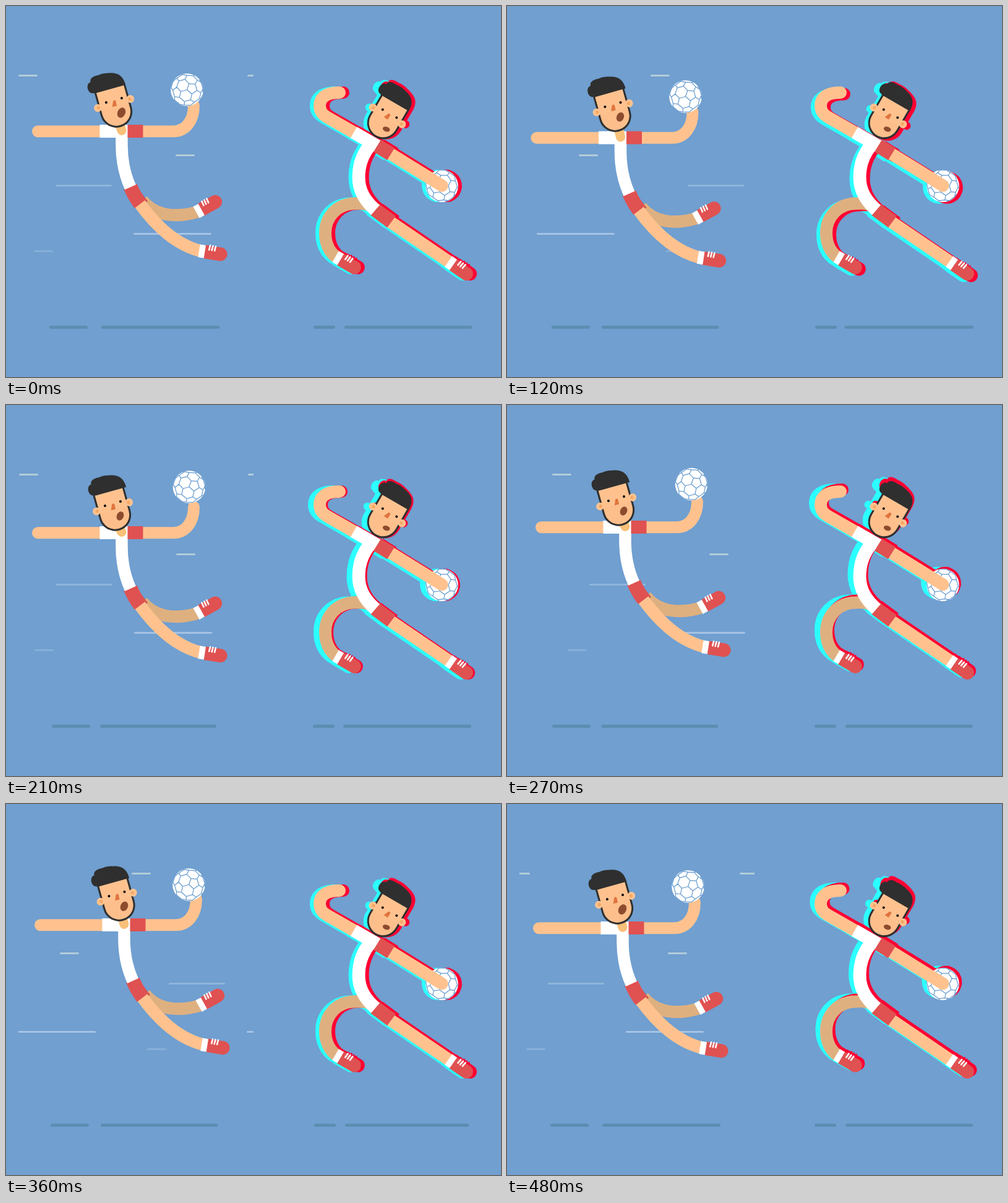
These frames come from a looping animation (800 px wide and 600 px high, 510 ms). An HTML page:

```html
<!DOCTYPE html>
<html lang="en">
<head>
<meta charset="utf-8">
<title>Handball players</title>
<style>
html, body { margin: 0; height: 100%; overflow: hidden; background: #709fd0; }
svg { display: block; width: 800px; height: 600px; }
path, line { fill: none; }
.limb { stroke-width: 20; }
.skin { stroke: #ffc28f; }
.tan { stroke: #dfb07f; }
.kit { stroke: #fff; stroke-width: 21; }
.red { stroke: #e05151; stroke-width: 23; }
.round { stroke-linecap: round; }
.lace { stroke: #fff; stroke-width: 2.6; stroke-linecap: round; }
.seam { stroke: #659ace; stroke-width: 1.2; }
.ground { stroke: #5b8eb0; stroke-width: 5; stroke-linecap: round; }
#gusts line { stroke-width: 3; stroke-linecap: round; }
</style>
</head>
<body>
<svg viewBox="0 0 800 600">
  <defs>
    <clipPath id="window"><path d="M20 90H400V420H20Z"/></clipPath>
    <filter id="cyan" color-interpolation-filters="sRGB">
      <feFlood flood-color="#2cffff"/><feComposite in2="SourceAlpha" operator="in"/>
    </filter>
    <filter id="crimson" color-interpolation-filters="sRGB">
      <feFlood flood-color="#ff0033"/><feComposite in2="SourceAlpha" operator="in"/>
    </filter>
    <pattern id="stubble" width="4.4" height="4.4" patternUnits="userSpaceOnUse">
      <circle cx="1" cy="1" r=".55" fill="#eda06c"/><circle cx="3.2" cy="3.2" r=".55" fill="#eda06c"/>
    </pattern>

    <!-- origin: middle of the top of the sock, x runs towards the toe -->
    <g id="shoe">
      <path d="M8 -11H34.5A11 11 0 0 1 34.5 11H8Z" style="fill:#e05151"/>
      <path d="M-.5 -10.5H9V10.5H-.5Z" style="fill:#fff"/>
      <path class="lace" d="M16 -11.3L15.300 -4M20.500 -11.300L19.800 -4M25 -11.300L24.300 -4"/>
    </g>

    <!-- head and hair, origin: midpoint between the eyes -->
    <g id="head">
      <path d="M-27.300 -22V18.500A26 26 0 0 0 24.700 18.500V-22Z" style="fill:#2f2f2f"/>
      <path d="M-24.300 -21V18.500A23 23 0 0 0 21.700 18.500V-21Z" style="fill:#ffc28f"/>
      <path d="M-24.300 10V18.500A23 23 0 0 0 21.700 18.500V10Z" style="fill:url(#stubble)"/>
      <g fill="#ffc28f"><circle cx="-28.500" cy="5" r="6.300"/><circle cx="26" cy="5" r="6.300"/></g>
      <g fill="#f5a865"><circle cx="-27.500" cy="5" r="2.600"/><circle cx="25" cy="5" r="2.600"/></g>
      <circle cx="-13" r="2"/><circle cx="13" r="2"/>
      <path d="M-1.500 .500Q1 -.500 2.500 1.500L2 10L-5.500 9.500Z" style="fill:#e0743f"/>
    </g>
    <path id="hair" d="M-26.500 -19L-31 -20.500C-38 -23 -37.500 -38 -28.500 -38.500C-29 -44 -23 -47 -13 -46C-8 -47 0 -46 4 -44.500C18 -42 25 -34 24.700 -19Z" style="fill:#2f2f2f"/>

    <g id="ball"><circle r="26.300" fill="#fff"/></g>
    <g id="gusts"></g>

    <g id="runner">
      <path class="limb tan" d="M594 326C582 318 573 319 563 319.500C535 320 516 341 516 367C516 385 522 397 533.500 406"/>
      <use href="#shoe" transform="translate(533 405.500) rotate(30)"/>
      <path class="limb skin" d="M618 347L717 414.500"/>
      <use href="#shoe" transform="translate(715.500 413.500) rotate(34.500)"/>
      <path class="red" d="M596 329L623 349"/>
      <path class="kit" d="M594 219C578 235 570 255 570 277C570 300 581 316 597 330"/>
      <path class="limb skin round" d="M539 140C515 140 507 150 507 161C507 171 512 176 520 180.500L562 204.500"/>
      <path class="kit" d="M562 204.500L602 227.500"/>
      <use href="#ball" transform="translate(704.500 291) rotate(70)"/>
      <path class="limb skin round" d="M618 237L704.500 290.500"/>
      <path class="red" d="M600 226L622 239.500"/>
      <g transform="translate(620 174) rotate(30)">
        <use href="#head"/>
        <use href="#hair"/>
        <ellipse cx="8" cy="24.500" rx="6" ry="4" transform="rotate(-12 8 24.500)" fill="#8d4b2e"/>
      </g>
    </g>
    <!-- the ghosts' hair flies a little behind -->
    <g id="ghost">
      <use href="#runner"/>
      <use href="#hair" transform="translate(617 170.500) rotate(30)"/>
    </g>
  </defs>

  <rect width="800" height="600" fill="#709fd0"/>
  <g clip-path="url(#window)"><g id="wind">
    <use href="#gusts" x="-370"/><use href="#gusts"/><use href="#gusts" x="370"/>
  </g></g>
  <g class="ground"><line id="g0"/><line id="g1"/><line id="g2"/><line id="g3"/></g>

  <g id="body">
    <path class="limb tan" d="M220 314C240 340 275 343 309 333"/>
    <use href="#shoe" transform="translate(308 333.500) rotate(-29)"/>
    <path d="M211 292L229 316L214 322Z" style="fill:#cd4648"/>
    <path class="limb skin" d="M215 318C235 346 268 384 314 396"/>
    <use href="#shoe" transform="translate(312.500 396) rotate(9)"/>
    <path class="red" d="M201 292Q207 307 217 320"/>
    <path class="kit" style="stroke-width:19.500" d="M187 200V225C187 250 192 273 201 293"/>
    <g style="stroke-width:19">
      <path class="skin round" d="M51.500 202.800H153"/>
      <path class="skin round" d="M220 202.800H270C290 202.800 303.500 186 303.500 161"/>
    </g>
    <path class="kit" d="M151.500 202.500H197"/>
    <path class="red" style="stroke-width:21" d="M196.500 202.500H221.500"/>
  </g>
  <line id="neck" class="round" stroke="#f9c079" stroke-width="15"/>
  <g id="headL"><g transform="translate(174.500 152.500) rotate(-15.600)">
    <use href="#head"/>
    <g transform="translate(6.200 22.500) rotate(40)"><ellipse id="mouth" fill="#8d4b2e"/></g>
  </g></g>
  <g id="hairL"><use href="#hair" transform="translate(174.500 152.500) rotate(-15.600)"/></g>
  <g id="ballL"><use href="#ball" x="292.500" y="135.500"/></g>

  <use id="ghostC" href="#ghost" filter="url(#cyan)"/>
  <use id="ghostR" href="#ghost" filter="url(#crimson)"/>
  <use href="#runner"/>
</svg>

<script>
const $ = id => document.getElementById(id);
const STEP = 30, STEPS = 17;

function set(el, attrs) {
  for (const k in attrs) el.setAttribute(k, attrs[k]);
}

function add(parent, tag, attrs) {
  const el = document.createElementNS('http://www.w3.org/2000/svg', tag);
  set(el, attrs);
  parent.append(el);
}

// Seams: a truncated icosahedron with one corner facing the viewer
// and the pentagon next to it turned by `tilt`.
function drawBall(radius, tilt) {
  const phi = (1 + Math.sqrt(5)) / 2, verts = [], corners = [];
  const dot = (a, b) => a.reduce((s, v, i) => s + v * b[i], 0);
  const mix = (a, b, k) => a.map((v, i) => v + k * b[i]);
  const unit = a => a.map(v => v / Math.hypot(...a));
  const cross = (a, b) => [0, 1, 2].map(i =>
    a[(i + 1) % 3] * b[(i + 2) % 3] - a[(i + 2) % 3] * b[(i + 1) % 3]);
  const dist = (a, b) => Math.hypot(...mix(a, b, -1));

  for (const a of [-1, 1]) for (const b of [-phi, phi])
    verts.push([0, a, b], [a, b, 0], [b, 0, a]);
  for (const a of verts) for (const b of verts)
    if (a !== b && dist(a, b) < 2.1) corners.push(unit(mix(a, b, 0.5)));

  const front = corners[0];
  const pentagon = verts.reduce((a, b) => dot(a, front) > dot(b, front) ? a : b);
  const side = unit(mix(pentagon, front, -dot(pentagon, front)));
  const up = cross(front, side);
  const flat = p => {
    const x = dot(p, side), y = dot(p, up), c = Math.cos(tilt), s = Math.sin(tilt);
    return [x * c - y * s, x * s + y * c].map(v => (v * radius).toFixed(2));
  };
  let d = '';
  corners.forEach((a, i) => corners.slice(i + 1).forEach(b => {
    if (dist(a, b) < 0.45 && dot(mix(a, b, 1), front) > 0)
      d += `M${flat(a).join(' ')}L${flat(b).join(' ')}`;
  }));
  add($('ball'), 'path', { class: 'seam', d });
}

function span(id, a, b) {
  set($(id), { x1: a + 2.5, x2: b - 2.5, y1: 519.5, y2: 519.5 });
}

drawBall(26.3, -0.27);
for (const [x, y, w, stroke] of [
  [20, 112.5, 31, '#b2ccd9'], [274, 241.5, 31, '#b2ccd9'], [80, 290.5, 91, '#90b5db'],
  [206, 368.5, 126, '#a5c3e4'], [45, 396.5, 31, '#87afd8']
]) add($('gusts'), 'line', { x1: x + 1.5, x2: x + w - 1.5, y1: y, y2: y, stroke });

// step, wind, body x y, ball x y, head x y, ground squeeze, hair lean
const poses = [
  [0, 0, 0, 0, 0, 0, 0, 0, 0, 0],
  [2, 106, -2, 5.5, -2, 5.5, -2, 3, 1, 0.5],
  [4, 212, -3.5, 10.5, -4, 11, -3.5, 7, 2, 2],
  [7, 371, 0, 4, 3.5, -3, -2, 7, 4, 3],
  [9, 423, 4, -5, 5.5, -7.5, 2, -1, 3, 3],
  [12, 553, 4, -7, 3, -5, 4.5, -7, 2, 1.5],
  [16, 726, 0, -2, 0, -2, 0, -2, 0, 0]
];
// step, ghost shift x y, ground ends
const glitches = [
  [0, 0, 0, 497, 547, 753],
  [2, 0, -3, 495, 545, 751],
  [4, 0, 2.5, 498, 545.5, 754],
  [7, -3, 0, 496, 545, 752],
  [9, -3, -3, 497, 547, 753],
  [12, 0, 0, 498, 548, 748],
  [16, -1.5, -3, 497, 547, 753]
];

// Pose i of the endless cycle, with time and wind running on.
function key(i) {
  const n = poses.length, lap = Math.floor(i / n), p = poses[i - lap * n].slice();
  p[0] += lap * STEPS;
  p[1] += lap * 740;
  return p;
}

// Smooth curve through the poses.
function poseAt(step) {
  let i = poses.length - 1;
  while (poses[i][0] > step) i--;
  const [p, a, b, n] = [key(i - 1), key(i), key(i + 1), key(i + 2)];
  const len = b[0] - a[0], s = (step - a[0]) / len;
  return a.map((v, c) => {
    const ma = (b[c] - p[c]) / (b[0] - p[0]) * len;
    const mb = (n[c] - v) / (n[0] - a[0]) * len;
    const d = b[c] - v;
    return v + s * (ma + s * (3 * d - 2 * ma - mb + s * (ma + mb - 2 * d)));
  });
}

function move(id, x, y) {
  set($(id), { transform: `translate(${x} ${y})` });
}

function draw(step) {
  const [, wind, bx, by, ox, oy, hx, hy, squeeze, lean] = poseAt(step);
  move('wind', wind % 370, 0);
  move('body', bx, by);
  move('ballL', ox, oy);
  move('headL', hx, hy);
  move('hairL', hx + lean, hy - lean * 0.6);
  set($('mouth'), { rx: 6.3 - lean * 0.25, ry: 8.6 - lean * 0.4 });
  set($('neck'), { x1: 187 + bx, y1: 201.5 + by, x2: 183 + hx, y2: 188 + hy });
  span('g0', 70 + squeeze, 132 + squeeze);
  span('g1', 154 - squeeze / 2, 345 - 1.25 * squeeze);

  const [, dx, dy, x, left, right] = glitches.filter(g => g[0] <= step).pop();
  move('ghostC', dx - 6, dy);
  move('ghostR', dx + 6, dy);
  span('g2', x, x + 35);
  span('g3', left, right);
}

let shown = -1;
function tick() {
  const step = Math.floor(performance.now() / STEP) % STEPS;
  if (step !== shown) draw(shown = step);
  requestAnimationFrame(tick);
}
tick();
</script>
</body>
</html>
```
